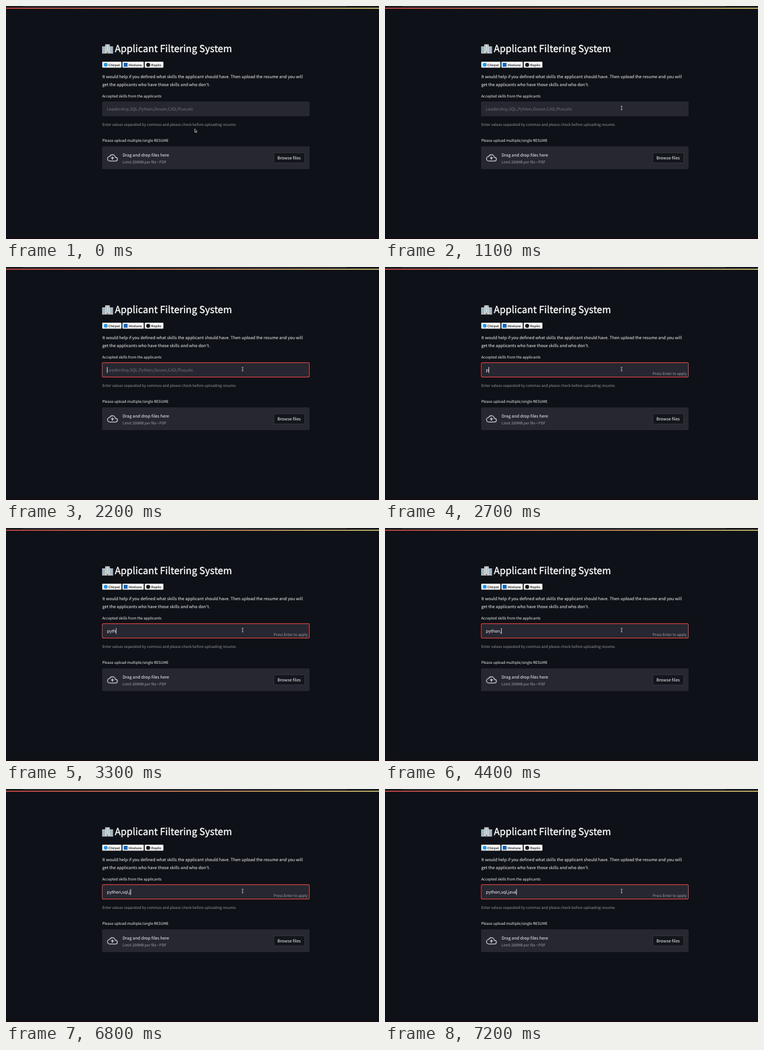
Recreate the animation shown at these times as an HTML page. Size 656 by 410 pixels, loop 8000 ms.

```html
<!DOCTYPE html>
<html lang="en">
<head>
<meta charset="utf-8">
<title>Applicant Filtering System</title>
<style>
  html, body { margin: 0; width: 100%; height: 100%; overflow: hidden; background: #0e1117; }
  svg { display: block; width: 656px; height: 410px; }
  text {
    font: 7.4px "Noto Sans CJK JP", "Noto Sans CJK SC", "Noto Sans CJK", "Noto Sans", sans-serif;
    fill: #fafafa; text-rendering: geometricPrecision; white-space: pre;
  }
  .small { font-size: 6.47px; }
  .dim { fill: #fafafa99; }
  .placeholder { fill: #fafafa5c; }
  .title { font-size: 16.7px; letter-spacing: .11px; stroke: #fafafa; stroke-width: .45px; }
  .badge { font: bold 5.8px "Liberation Sans", Arial, sans-serif; fill: #333; }
  .bullet { font-family: "Open Sans", sans-serif; }
</style>
</head>
<body>
<svg viewBox="0 0 656 410">
  <defs>
    <linearGradient id="rainbow">
      <stop stop-color="#e2504a"/>
      <stop offset="1" stop-color="#e6d77c"/>
    </linearGradient>
  </defs>
  <rect width="656" height="410" fill="#0e1117"/>
  <rect width="656" height="2.6" fill="#17191f"/>
  <rect x="30" width="569" height="1" fill="#3a3b40"/>
  <rect y="3.2" width="656" height="1.6" fill="url(#rainbow)"/>
  <rect y="408" width="656" height="2" fill="#190a12"/>

  <!-- Office buildings -->
  <g>
    <path fill="#b4bcc2" d="M169 71h6v12.500h-6zM182 71h6.300v12.500H182z"/>
    <path fill="#d9d7d0" d="M174.500 67.500h8v16h-8z"/>
    <path stroke="#5f9fc4" stroke-width="1" stroke-dasharray="1.500 1" d="M170.800 72v9M173.200 72v9M184 72v9M186.700 72v9"/>
    <path stroke="#6aa5c6" stroke-width="1.200" stroke-dasharray="1.700 1" d="M176.600 69v10M180.400 69v10"/>
    <path fill="#92664f" d="M177.300 80.500h2.400v3h-2.400z"/>
    <path fill="#71818b" d="M168.800 83h19.700v1h-19.700z"/>
  </g>
  <text class="title" x="191.500" y="81.300">Applicant Filtering System</text>

  <g fill="#f7f7f7">
    <rect x="169.300" y="98" width="33.700" height="10.500" rx="1"/>
    <rect x="204.800" y="98" width="37.400" height="10.500" rx="1"/>
    <rect x="244" y="98" width="32.800" height="10.500" rx="1"/>
  </g>
  <circle cx="175.400" cy="103.400" r="3.300" fill="#1d9bf0"/>
  <rect x="207" y="100" width="6.800" height="6.800" fill="#0a66c2"/>
  <circle cx="250" cy="103.400" r="3.500" fill="#181717"/>
  <text class="badge" x="180" y="105.500">Chirpet</text>
  <text class="badge" x="215.800" y="105.500">Hirelune</text>
  <text class="badge" x="255.300" y="105.500">Repilo</text>

  <text x="169.200" y="127.400">It would help if you defined what skills the applicant should have. Then upload the resume and you will</text>
  <text x="169.200" y="140.500">get the applicants who have those skills and who don't.</text>

  <text class="small" x="169.200" y="160.900">Accepted skills from the applicants</text>
  <rect x="169" y="168" width="365" height="26" rx="2" fill="#262730"/>
  <rect id="focus" x="169.300" y="168.400" width="364.200" height="25.200" rx="2" fill="none" stroke="#ff4b4b" stroke-width="1.100"/>
  <text id="placeholder" class="placeholder" x="177.600" y="184">Leadership,SQL,Pyhton,Duvon,CAD,Pluo,etc</text>
  <text id="typed" x="177.600" y="184"></text>
  <rect id="caret" y="176" width=".9" height="10.500" fill="#fafafa"/>
  <text id="hint" class="small dim" x="530.500" y="190.400" text-anchor="end">Press Enter to apply</text>
  <text class="small dim" x="169.200" y="210.700">Enter values separated by commas and please check before uploading resume.</text>

  <text class="small" x="169.200" y="239.400">Please upload multiple/single RESUME</text>
  <rect x="169" y="247" width="365" height="40" rx="2" fill="#262730"/>
  <g transform="translate(177.700 257.700) scale(.79)">
    <path fill="none" stroke="#b9babf" stroke-width="2" d="M6 19a5 5 0 0 1 0-10c1-2.500 3.200-4 6-4a6.500 6.500 0 0 1 6.500 6h.5a4 4 0 0 1 0 8z"/>
    <path fill="#b9babf" d="M8 13h2.550v3h2.900v-3H16l-4-4z"/>
  </g>
  <text x="205" y="264.700">Drag and drop files here</text>
  <text class="small dim" x="205" y="277">Limit 200MB per file <tspan class="bullet">•</tspan> PDF</text>
  <rect x="471" y="258.200" width="54.500" height="18" rx="2" fill="#13161d" stroke="#fafafa33" stroke-width=".6"/>
  <text x="477.200" y="270">Browse files</text>

  <path id="arrow" d="M-1.700-3.500v6.200l1.500-1.200 1 2.100 1-.5-1-2h1.700z" fill="#15171c" stroke="#dcdcde" stroke-width=".7"/>
  <path id="beam" d="M-1.400-3.200h1l.4.3.4-.3h1M0-2.900v5.800M-1.400 3.200h1l.4-.3.4.3h1" fill="none" stroke="#e4e4e6" stroke-width=".8"/>
</svg>
<script>
const LOOP = 8000;
const FOCUS_AT = 2100;
const TYPING_AT = 2700;
const INPUT_X = 177.6;
const TEXT = "python,sql,java";

// [time, characters typed]
const keys = [[0, 0], [2700, 1], [3000, 2], [3200, 3], [3300, 4], [3500, 5], [3700, 6], [4400, 7],
  [4900, 8], [5200, 10], [5900, 11], [6800, 12], [6900, 13], [7100, 14], [7200, 15]];
// [time, x, y]
const pointer = [[0, 333.5, 219.5], [300, 346, 215.5], [400, 374, 206], [500, 400, 196.5],
  [600, 411.7, 191.4], [1000, 414.5, 184], [1100, 416.1, 179.6]];

const el = id => document.getElementById(id);
const [focus, placeholder, typed, caret, hint, arrow, beam] =
  ["focus", "placeholder", "typed", "caret", "hint", "arrow", "beam"].map(el);
const latest = (steps, t) => steps.findLast(step => step[0] <= t);
const show = (node, visible) => node.setAttribute("visibility", visible ? "visible" : "hidden");

function draw(t) {
  const [, x, y] = latest(pointer, t);
  const overInput = y < 194;
  for (const node of [arrow, beam]) node.setAttribute("transform", `translate(${x} ${y})`);
  show(arrow, !overInput);
  show(beam, overInput);

  const typing = t >= TYPING_AT;
  show(placeholder, !typing);
  show(hint, typing);
  typed.textContent = TEXT.slice(0, latest(keys, t)[1]);

  const focused = t >= FOCUS_AT;
  show(focus, focused);
  focus.setAttribute("opacity", t < FOCUS_AT + 100 ? .65 : .85);
  show(caret, focused && !(t >= 5700 && t < 5900));
  caret.setAttribute("x", INPUT_X + (typing ? typed.getComputedTextLength() : 0));
}

const start = performance.now();
function tick() {
  draw((performance.now() - start) % LOOP);
  requestAnimationFrame(tick);
}
tick();
</script>
</body>
</html>
```
